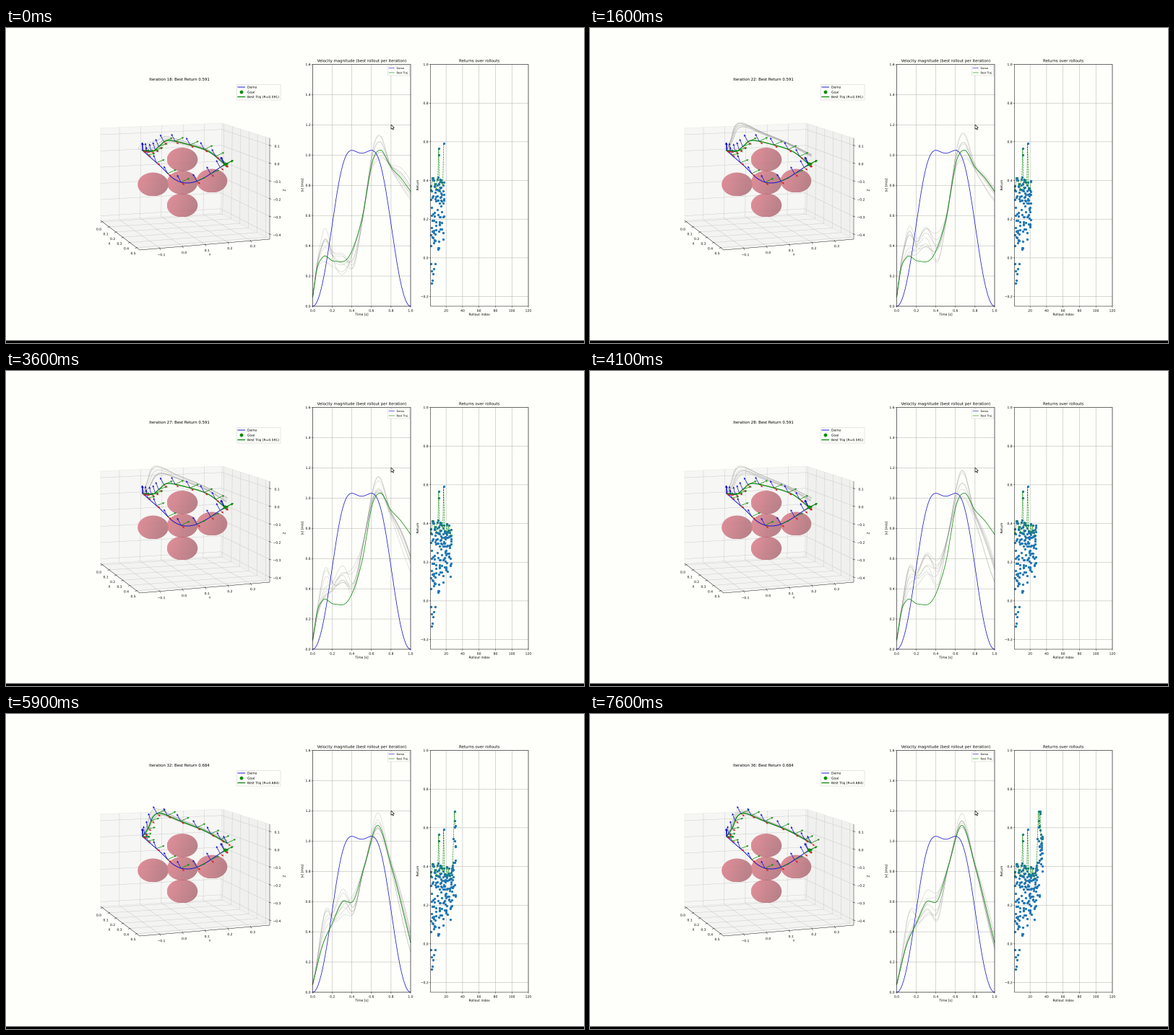
Animation of 800x437 px, one loop 8000 ms. Source, as a matplotlib script:

```python
import numpy as np
import matplotlib.pyplot as plt
from matplotlib.animation import FuncAnimation
from matplotlib.collections import LineCollection
from matplotlib.patches import Ellipse, PathPatch, Polygon, Rectangle
from matplotlib.textpath import TextPath
from matplotlib.transforms import Affine2D

W, H, DPI = 800, 437, 100
PT = 72 / DPI
PAPER, BLUE, GREEN, RED = "#fefefa", "#1010cc", "#0a8a0a", "#cc2222"
DOT = "#1f77b4"
TITLE, NORMAL, SMALL = 5.39, 4.49, 3.59

plt.rcParams["font.family"] = "DejaVu Sans"
plt.rcParams["path.snap"] = False
fig = plt.figure(figsize=(W / DPI, H / DPI), dpi=DPI, facecolor=PAPER)
ax = fig.add_axes([0, 0, 1, 1])
ax.axis("off")


def line(xs, ys, color="black", width=0.5, z=2, **kw):
    return ax.plot(xs, ys, color=color, lw=width * PT, zorder=z, **kw)[0]


def polyline(*pts, **kw):
    line(*np.array(pts, float).T, **kw)


def text_outline(x, y, text, size=NORMAL, ha="center", angle=0):
    """Unhinted text, centred vertically on its capitals."""
    outline = TextPath((0, 0), text, size=size)
    ext = outline.get_extents()
    anchor = {"left": 0, "center": (ext.x0 + ext.x1) / 2, "right": ext.x1}[ha]
    place = Affine2D().translate(-anchor, -0.365 * size).scale(1, -1)
    return place.rotate_deg(-angle).translate(x, y).transform_path(outline)


def label(*args, **kw):
    return ax.add_patch(PathPatch(text_outline(*args, **kw), fc="black", ec="none", zorder=9))


def number(value):
    return f"{value:.1f}".replace("-", "\u2212")


def box(x0, y0, x1, y1, face="none", edge="black", width=0.5, z=6):
    ax.add_patch(Rectangle((x0, y0), x1 - x0, y1 - y0, fc=face, ec=edge,
                           lw=width * PT, zorder=z))


def disc(x, y, d, z):
    ax.add_patch(Ellipse((x, y), d, d, fc=GREEN, ec="none", zorder=z))


def mix(a, b, u):
    return np.asarray(a, float) * (1 - u) + np.asarray(b, float) * u


def smooth(xs, ys, t):
    """Cubic Hermite curve through the given points."""
    xs, ys = np.asarray(xs, float), np.asarray(ys, float)
    m = np.gradient(ys, xs)
    i = np.clip(np.searchsorted(xs, t, "right") - 1, 0, len(xs) - 2)
    h = xs[i + 1] - xs[i]
    u = (t - xs[i]) / h
    return ((1 + 2 * u) * (1 - u) ** 2 * ys[i] + u * (1 - u) ** 2 * h * m[i]
            + u * u * (3 - 2 * u) * ys[i + 1] + u * u * (u - 1) * h * m[i + 1])


T = np.linspace(0, 1, 141)


def path(*points):
    k = np.linspace(0, 1, len(points))
    return np.column_stack([smooth(k, c, T) for c in zip(*points)])


def speed(*points):
    return smooth(*zip(*points), T)


# ---- trajectories and their speeds ----------------------------------------
START = (189, 170)
DEMO_PATH = path(START, (212, 190), (232, 209), (250, 215), (271, 209.5), (303, 189))
BEST_PATHS = [
    path(START, (203, 171), (213, 163), (224, 156), (250, 161), (280, 171), (303, 189)),
    path(START, (197, 158), (204, 142), (215, 138), (240, 148), (275, 162), (306, 179))]
DEMO_SPEED = (1.066 * np.sin(np.pi * T) ** 2 + 0.249 * np.sin(2 * np.pi * T) ** 2
              - 0.054 * np.sin(3 * np.pi * T) ** 2)
BEST_SPEEDS = [
    speed((0, .06), (.04, .235), (.1, .322), (.21, .30), (.38, .34), (.5, .57), (.62, .98),
          (.69, 1.033), (.8, .92), (.9, .85), (1, .76)),
    speed((0, .05), (.1, .31), (.2, .455), (.3, .595), (.42, .61), (.53, .84), (.664, 1.104),
          (.8, .84), (1, .33))]


# ---- 3D scene -------------------------------------------------------------
LT, BT, RT = (131, 139), (299, 132), (365, 153)
LB, BB, RB, FB = (131, 267), (297, 257), (365, 293), (185, 308)


def draw_scene():
    for quad, shade in (((LT, BT, BB, LB), "#f6f6f4"), ((BT, RT, RB, BB), "#f0f0ee"),
                        ((LB, BB, RB, FB), "#f3f3f1")):
        ax.add_patch(Polygon(quad, fc=shade, ec="#e2e2e0", lw=0.4 * PT, zorder=1))
    grid = dict(color="#c4c4c4", width=0.4, z=1.5)
    polyline(LB, FB, RB, RT, width=0.4)

    for k, u in enumerate(np.linspace(0.04, 0.92, 6)):
        x, y = mix(LB, FB, u)
        polyline((x, y), mix(BB, RB, u), mix(BT, RT, u), **grid)
        polyline((x + 1, y - 0.4), (x - 2, y + 1), width=0.4)
        label(128.5 + 9.5 * k, 279 + 6.7 * k, number(k / 10))
    for k, u in enumerate(np.linspace(0.155, 0.855, 5)):
        x, y = mix(FB, RB, u)
        polyline((x, y), mix(LB, BB, u), mix(LT, BT, u), **grid)
        polyline((x - 0.5, y - 1), (x + 1, y + 2), width=0.4)
        label(215 + 31.6 * k, 314.5 - 3 * k, number((k - 1) / 10))
    for k, u in enumerate(np.linspace(0.07, 0.95, 6)):
        x, y = mix(RT, RB, u)
        polyline(mix(LT, LB, u), mix(BT, BB, u), (x, y), **grid)
        polyline((x - 1, y - 0.3), (x + 2, y + 0.7), width=0.4)
        label(375, y + 1.2, number((1 - k) / 10))
    label(143, 299, "X")
    label(282, 314.5, "Y")
    label(385, 225, "Z", angle=90)

    ramp = np.add.outer(np.linspace(0, 0.25, 40), np.linspace(0, 0.75, 40))[..., None]
    skin = mix([0.88, 0.50, 0.55], [0.66, 0.43, 0.46], ramp)
    for dx, dy in ((0, 31.5), (-40.5, 2.5), (41, -2.5), (0, 0), (0, -32)):
        x, y, rx, ry = 244 + dx, 214.5 + dy, 21.3, 16.5
        im = ax.imshow(skin, extent=(x - rx, x + rx, y + ry, y - ry), alpha=0.87,
                       aspect="auto", zorder=2.5)
        im.set_clip_path(Ellipse((x, y), 2 * rx, 2 * ry, transform=ax.transData))


def frames_on(curve, speeds, count=11):
    """Small coordinate frames along a curve, evenly spaced in time."""
    arc = np.r_[0, np.cumsum(np.hypot(*np.diff(curve, axis=0).T))] / 1.0
    travelled = np.cumsum(speeds) - speeds[0]
    s = np.interp(np.linspace(0, 1, count), T, travelled / travelled[-1])
    x, y = (np.interp(s * arc[-1], arc, c) for c in curve.T)
    turn = np.minimum(s * 4, 1)
    return [ax.quiver(x, y, u, v, color=color, angles="xy", scale_units="xy", scale=1,
                      units="dots", width=0.7, headwidth=4.6, headlength=4.6,
                      headaxislength=3.6, zorder=4)
            for color, u, v in ((RED, 5 + 0 * s, 2 + 2 * turn),
                                (GREEN, 10 + 2 * turn, -5.5 * turn),
                                (BLUE, -0.5 - 5 * turn, -11.5 + 1.2 * turn))]


draw_scene()
line(*DEMO_PATH.T, color=BLUE, width=0.95, z=3)
frames_on(DEMO_PATH, DEMO_SPEED)
best_frames = [frames_on(p, v) for p, v in zip(BEST_PATHS, BEST_SPEEDS)]
disc(303.5, 189, 5, 4.5)

box(319.5, 78.5, 380, 100, face=PAPER, edge="#d0d0d0")
line([321, 330.5], [82, 82], BLUE, 0.95, 7)
disc(326, 89, 4.8, 7)
line([321, 330.5], [95.5, 95.5], GREEN, 1.3, 7)
label(334, 82, "Demo", ha="left")
label(334, 89, "Goal", ha="left")


# ---- 2D plots -------------------------------------------------------------
def vx(t):
    return 424.5 + 135.5 * t


def vy(v):
    return 386 - 209.7 * v


def rx(i):
    return 587.5 + 1.1387 * (i - 1)


def ry(r):
    return 318.9 - 268.4 * r


def plot_frame(left, right, xticks, yticks, title, xlabel, ylabel, ylabel_x):
    box(left, 50.5, right, 386)
    for x, text in xticks:
        line([x, x], [50.5, 386], "#b0b0b0", 0.5, 1)
        line([x, x], [386, 387.6], width=0.4)
        label(x, 392, text)
    for y, text in yticks:
        line([left, right], [y, y], "#b0b0b0", 0.5, 1)
        line([left - 1.6, left], [y, y], width=0.4)
        label(left - 3.2, y, text, ha="right")
    label((left + right) / 2, 45.3, title, TITLE)
    label((left + right) / 2, 397.2, xlabel)
    label(ylabel_x, 218, ylabel, angle=90)


plot_frame(424.5, 560, [(vx(k / 5), number(k / 5)) for k in range(6)],
           [(vy(k / 5), number(k / 5)) for k in range(9)],
           "Velocity magnitude (best rollout per iteration)", "Time [s]", "|v| [m/s]", 409.8)
plot_frame(587.5, 723, [(rx(k), str(k)) for k in range(20, 121, 20)],
           [(ry(k / 5), number(k / 5)) for k in range(-1, 6)],
           "Returns over rollouts", "Rollout index", "Return", 569.5)

box(528.5, 52.5, 558.5, 66, face=PAPER, edge="#d0d0d0")
for y, text, color in ((55.7, "Demo", BLUE), (62, "Best Traj", GREEN)):
    line([530, 537.5], [y, y], color, 0.6, 7)
    label(540.5, y, text, SMALL, ha="left")
line(vx(T), vy(DEMO_SPEED), BLUE, 0.75, 4)


# ---- exploration ----------------------------------------------------------
FIRST, LAST, PER_ITERATION = 18, 36, 6
RECORDS = {3: 0.415, 11: 0.565, 17: 0.591, 29: 0.545, 30: 0.684, 32: 0.684}


def bump(center, width):
    return np.exp(-((T - center) / width) ** 2)


def rollouts(iteration, count=8):
    """Noisy variations that drift from the first best motion to the second."""
    rng = np.random.default_rng(iteration)
    drift = np.clip((iteration - 23) / 8.5, 0, 1)
    lift = min((iteration - FIRST) / 4, 1)
    base = mix(*BEST_SPEEDS, drift)
    speeds, paths = [], []
    for _ in range(count):
        early, mid, dip, peak, end = rng.uniform(-1, 1, 5)
        v = (base + (0.08 + 0.12 * early) * bump(0.13, 0.07)
             + (0.18 * lift * (1 - drift) + 0.09 * mid) * bump(0.3, 0.1)
             + (0.1 * dip - 0.05) * bump(0.42, 0.07)
             + (0.02 + 0.1 * peak) * bump(0.67, 0.09) + 0.08 * end * bump(0.95, 0.14))
        speeds.append(np.column_stack([vx(T), vy(v)]))
        curve = mix(*BEST_PATHS, lift + rng.uniform(-0.25, 0.35))
        curve[:, 0] -= 22 * (1 - lift) * rng.random() * bump(0.2, 0.12)
        paths.append(curve)
    return speeds, paths


def returns(index):
    rng = np.random.default_rng(index)
    usual = 0.32 + 0.1 * rng.random() + 0.2 * (index > 30)
    top = RECORDS.get(index, usual)
    low = np.interp(index, [1, 5, 12, 30, 35], [-0.2, -0.15, 0.05, 0.25, 0.38])
    low += rng.uniform(-0.07, 0.07)
    return np.r_[top, low + (top - low) * rng.random(PER_ITERATION - 1) ** 0.8]


ROLLOUTS = {k: rollouts(k) for k in range(FIRST, LAST + 1)}
INDEX = np.arange(1, LAST)
RETURNS = np.array([returns(k) for k in INDEX])

grey_speeds, grey_paths = (LineCollection([], colors="#808080", alpha=0.38, linewidths=0.55 * PT,
                                          zorder=z) for z in (3, 2.8))
for c in (grey_speeds, grey_paths):
    ax.add_collection(c, autolim=False)
best_path = line([], [], GREEN, 1.3, 3.5)
best_speed = line([], [], GREEN, 0.75, 4)
best_returns = line([], [], GREEN, 0.65, 4.6, ls="--")
dots = line([], [], DOT, 0, 4.5, ls="none", marker="o", ms=3.3 * PT, mew=0)
title = label(240, 71, "-", TITLE)
best_label = label(334, 95.5, "-", ha="left")

# pointer and bottom strip
ax.add_patch(Polygon([(533, 134), (533, 140.4), (534.5, 139.1), (535.6, 141.2), (536.5, 140.7),
                      (535.5, 138.7), (537.4, 138.5)], fc="white", ec="black", lw=0.6 * PT,
                     zorder=10))
ax.add_patch(Rectangle((0, 433.5), W, 5, fc="black", ec="none", zorder=10))
ax.set(xlim=(0, W), ylim=(H, 0))

# tenths of a second at which each iteration appears, with one pause midway
STARTS = [4 * k for k in range(11)] + [46 + int(4.34 * k) for k in range(8)]


def update(frame):
    iteration = FIRST - 1 + int(np.searchsorted(STARTS, frame, "right"))
    stage = int(iteration > 30)
    best = RECORDS[(17, 30)[stage]]
    title.set_path(text_outline(240, 71, f"Iteration {iteration}: Best Return {best}", TITLE))
    best_label.set_path(text_outline(334, 95.5, f"Best Traj (R={best})", ha="left"))

    speeds, paths = ROLLOUTS[iteration]
    grey_speeds.set_segments(speeds)
    grey_paths.set_segments(paths)
    best_path.set_data(*BEST_PATHS[stage].T)
    best_speed.set_data(vx(T), vy(BEST_SPEEDS[stage]))
    for k, group in enumerate(best_frames):
        for q in group:
            q.set_visible(k == stage)

    shown = INDEX[:iteration - 1]
    values = RETURNS[:iteration - 1]
    best_returns.set_data(rx(shown), ry(values.max(axis=1)))
    dots.set_data(np.repeat(rx(shown), PER_ITERATION), ry(values.ravel()))
    return []


anim = FuncAnimation(fig, update, frames=80, interval=100, repeat=True, repeat_delay=0, blit=False)
plt.show()
```
